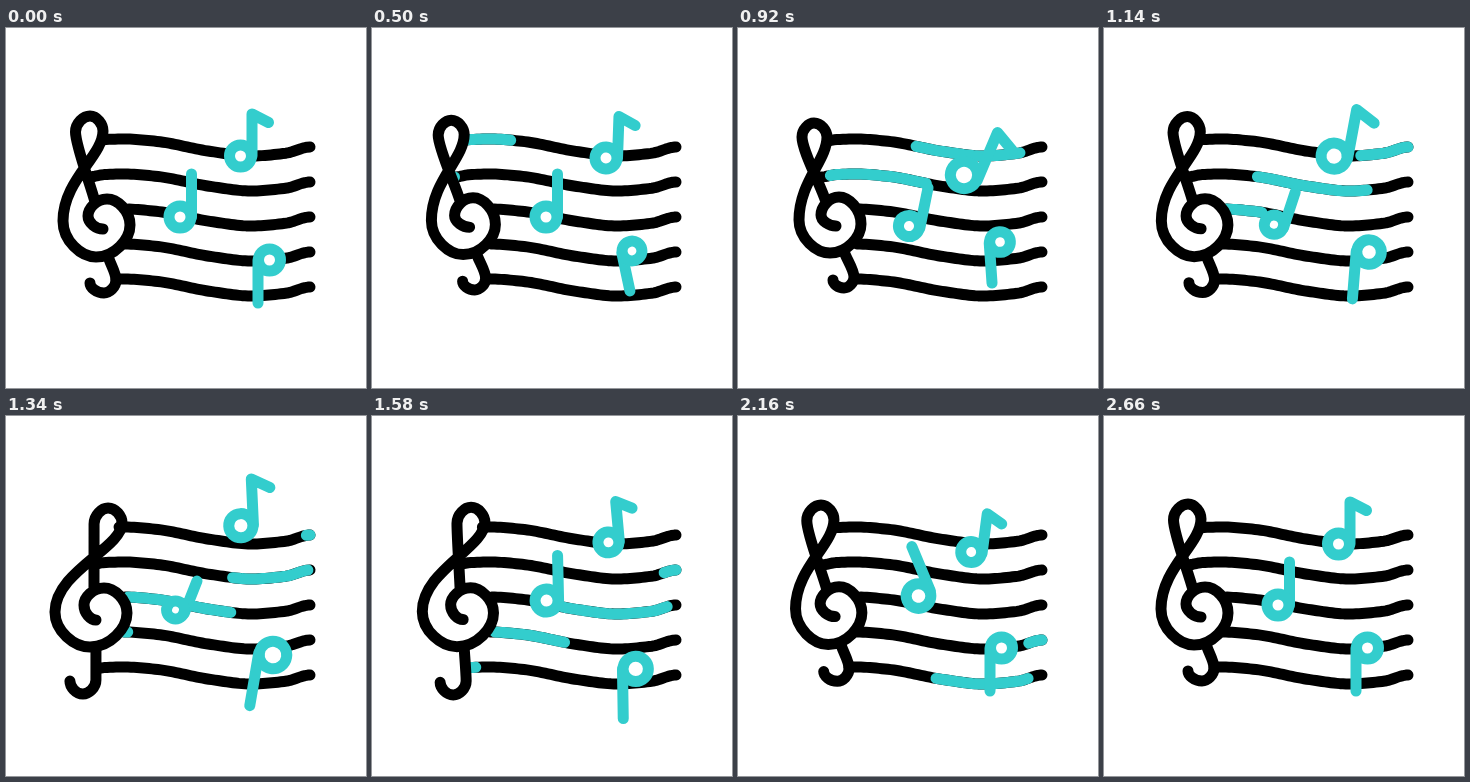
Write an HTML page that moves like this. It is 360 px wide and 360 px high and loops after 3 s.

```html
<!DOCTYPE html>
<html lang="en">
<head>
<meta charset="utf-8">
<title>Music staff</title>
<style>
html, body { margin: 0; height: 100%; overflow: hidden; background: #fff; }
svg { display: block; width: 100vw; height: 100vh; }
path, circle { fill: none; stroke-width: 11; stroke-linecap: round; stroke-linejoin: round; }
#staff path, #clef path { stroke: #000; }
#staff path.sweep, #notes path, #notes circle { stroke: #33cdcd; }
#notes circle { fill: #fff; }
</style>
</head>
<body>
<svg viewBox="0 0 360 360">
  <g id="staff"></g>
  <g id="clef"><path id="body"/><path id="hook"/></g>
  <g id="notes"></g>
</svg>
<script>
const LOOP = 3000;
const NS = 'http://www.w3.org/2000/svg';
const $ = id => document.getElementById(id);

function add(parent, tag, attrs = {}) {
  const el = parent.appendChild(document.createElementNS(NS, tag));
  for (const key in attrs) el.setAttribute(key, attrs[key]);
  return el;
}

const clamp = v => Math.min(1, Math.max(0, v));
const smooth = v => { v = clamp(v); return v * v * (3 - 2 * v); };
const mix = (a, b, k) => a + (b - a) * k;

// Monotone cubic through [x, y] keys; flat at every turning point.
function curve(keys) {
  const n = keys.length;
  const slope = i => (keys[i + 1][1] - keys[i][1]) / (keys[i + 1][0] - keys[i][0]);
  const tangent = keys.map((_, i) => {
    if (i === 0 || i === n - 1) return 0;
    const a = slope(i - 1), b = slope(i);
    return a * b > 0 ? 2 * a * b / (a + b) : 0;
  });
  return x => {
    if (x <= keys[0][0]) return keys[0][1];
    if (x >= keys[n - 1][0]) return keys[n - 1][1];
    let i = 0;
    while (x > keys[i + 1][0]) i++;
    const [x0, y0] = keys[i], [x1, y1] = keys[i + 1];
    const w = x1 - x0, u = (x - x0) / w, v = 1 - u;
    return y0 * (1 + 2 * u) * v * v + tangent[i] * w * u * v * v
         + y1 * u * u * (3 - 2 * u) - tangent[i + 1] * w * u * u * v;
  };
}

// Clef: only the outermost points of each bend, in three poses.
const rest = {
  body: [89,174, 69.5,104, 84,88, 97,103, 57,193, 90,229, 124,197, 101,171, 82,188, 97,201],
  hook: [103,231, 110,252, 98,265, 84,255]
};
const left = {
  body: [88,174, 64,109, 76,95, 89,109, 61,192, 92,225, 123,196, 101,169, 83,187, 98,198],
  hook: [107,226, 116,249, 106,260, 95,252]
};
const right = {
  body: [88,174, 88,108, 102,92, 116,107, 49,196, 84,231, 121,197, 98,172, 78,189, 90,204],
  hook: [90,231, 90,264, 77,278, 64,265]
};

const lean = curve([[220, 0], [500, -.6], [920, -1], [1340, 1], [1440, 1.22],
                    [1800, .02], [2160, -.13], [2600, 0]]);
const hookDrop = curve([[1400, 0], [1800, 7], [2160, 1], [2500, 0]]);

function pose(part, k) {
  const to = (k < 0 ? left : right)[part];
  const v = rest[part].map((n, i) => mix(n, to[i], Math.abs(k)));
  return v.flatMap((n, i) => i % 2 ? [] : [[n, v[i + 1]]]);
}

const cubic = (...pts) => 'C' + pts.map(p => p.map(n => n.toFixed(2)).join(' ')).join(' ');

// Quarter ellipses, turning from upright to level and back.
function arcs(pts) {
  let d = '';
  for (let i = 1; i < pts.length; i++) {
    const [a, b] = [pts[i - 1], pts[i]];
    d += i % 2
      ? cubic([a[0], mix(a[1], b[1], .55)], [mix(b[0], a[0], .45), b[1]], b)
      : cubic([mix(a[0], b[0], .55), a[1]], [b[0], mix(b[1], a[1], .45)], b);
  }
  return d;
}

function bodyPath(p) {
  const [stem, loop, , side, bulge] = p;
  const h = bulge[1] - side[1];
  return `M${stem}` +
    cubic([stem[0] + .2 * (loop[0] - stem[0]), stem[1] - 16], [loop[0], loop[1] + 14], loop) +
    arcs(p.slice(1, 4)) +
    cubic([side[0], side[1] + .28 * h], [bulge[0], bulge[1] - .455 * h], bulge) +
    arcs(p.slice(4));
}

function hookPath(p) {
  const [a, b] = p;
  return `M${a}` +
    cubic([mix(a[0], b[0], .3), mix(a[1], b[1], .3)], [b[0], b[1] - 7], b) +
    arcs(p.slice(1));
}

// Staff: one wave, five times; the near ends follow the clef.
const END = 304;
const GAP = 35;
const wave = curve([[83, 114], [98, 111.6], [118, 111], [150, 113.3], [205, 123.5],
                    [245, 128], [280, 125.2], [304, 119]]);
const lines = [];

// starts: x at rest, leaning left, leaning right; head, tail: [begin, duration].
function addLine(starts, head, tail) {
  const base = add($('staff'), 'path');
  const sweep = add($('staff'), 'path', { class: 'sweep' });
  lines.push({ starts, head, tail, base, sweep });
}
addLine([97, 90, 113], [248, 840], [533, 880]);
addLine([83, 81, 88], [470, 925], [796, 915]);
addLine([123, 122, 119], [930, 750], [1285, 700]);
addLine([119, 119, 118], [1283, 688], [1506, 783]);
addLine([110, 117, 92], [1480, 815], [1780, 815]);

function wavePath(from, to, dy) {
  const pts = [];
  for (let x = from; x < to; x += 3) pts.push(x);
  pts.push(to);
  return 'M' + pts.map(x => `${x.toFixed(2)} ${(wave(x) + dy).toFixed(2)}`).join('L');
}

// Notes: keys are [time, x, y, scale, angle] of the head.
const notes = [];
function addNote(stem, keys) {
  const g = add($('notes'), 'g');
  add(g, 'path', { d: stem });
  add(g, 'circle', { r: 11 });
  notes.push({ g, tracks: [1, 2, 3, 4].map(c => curve(keys.map(k => [k[0], k[c]]))) });
}
addNote('M11.5 0V-42L28 -33.5', [
  [220, 234.5, 128, 1, 0], [500, 234, 130, 1, 2], [920, 226, 147, 1.24, 23],
  [1360, 235, 109.5, 1.09, -3], [1800, 237, 143, .86, -6],
  [2160, 233.2, 136, .95, 7.5], [2640, 234.5, 128, 1, 0]]);
addNote('M11.5 0V-43', [
  [500, 174, 189, 1, 0], [920, 171, 198, .96, 11.5], [1340, 169.5, 194, .81, 21.6],
  [1800, 179.5, 178, 1.25, -21.7], [2160, 180.5, 180, 1.12, -22.6],
  [2660, 174, 189, 1, 0]]);
addNote('M-11.5 0V43', [
  [220, 263.5, 232, 1, 0], [500, 260, 223, .9, -12], [920, 262, 214, .94, -4],
  [1340, 267, 239, 1.25, 9.7], [1560, 264, 253, 1.16, 0],
  [1800, 261, 247, 1.06, -9], [2160, 263.5, 232, 1, 0]]);

function draw(t) {
  const k = lean(t), drop = hookDrop(t);
  $('body').setAttribute('d', bodyPath(pose('body', k)));
  $('hook').setAttribute('d', hookPath(pose('hook', k).map(([x, y], i) =>
    i ? [x + drop * .3, y + drop] : [x, y])));

  lines.forEach(({ starts, head, tail, base, sweep }, i) => {
    const x0 = mix(starts[0], starts[k < 0 ? 1 : 2], Math.abs(k));
    const at = ([begin, span]) => smooth((t - begin) / span);
    const from = at(tail), to = at(head);
    base.setAttribute('d', wavePath(x0, END, i * GAP));
    const on = to > 0 && from < 1;
    sweep.setAttribute('d', on ? wavePath(mix(x0, END, from), mix(x0, END, to), i * GAP) : '');
  });

  for (const { g, tracks } of notes) {
    const [x, y, s, a] = tracks.map(f => f(t));
    g.setAttribute('transform', `translate(${x} ${y}) rotate(${a}) scale(${s})`);
    for (const el of g.children) el.style.strokeWidth = 11 / s;
  }
}

function tick() {
  draw(performance.now() % LOOP);
  requestAnimationFrame(tick);
}
tick();
</script>
</body>
</html>
```
